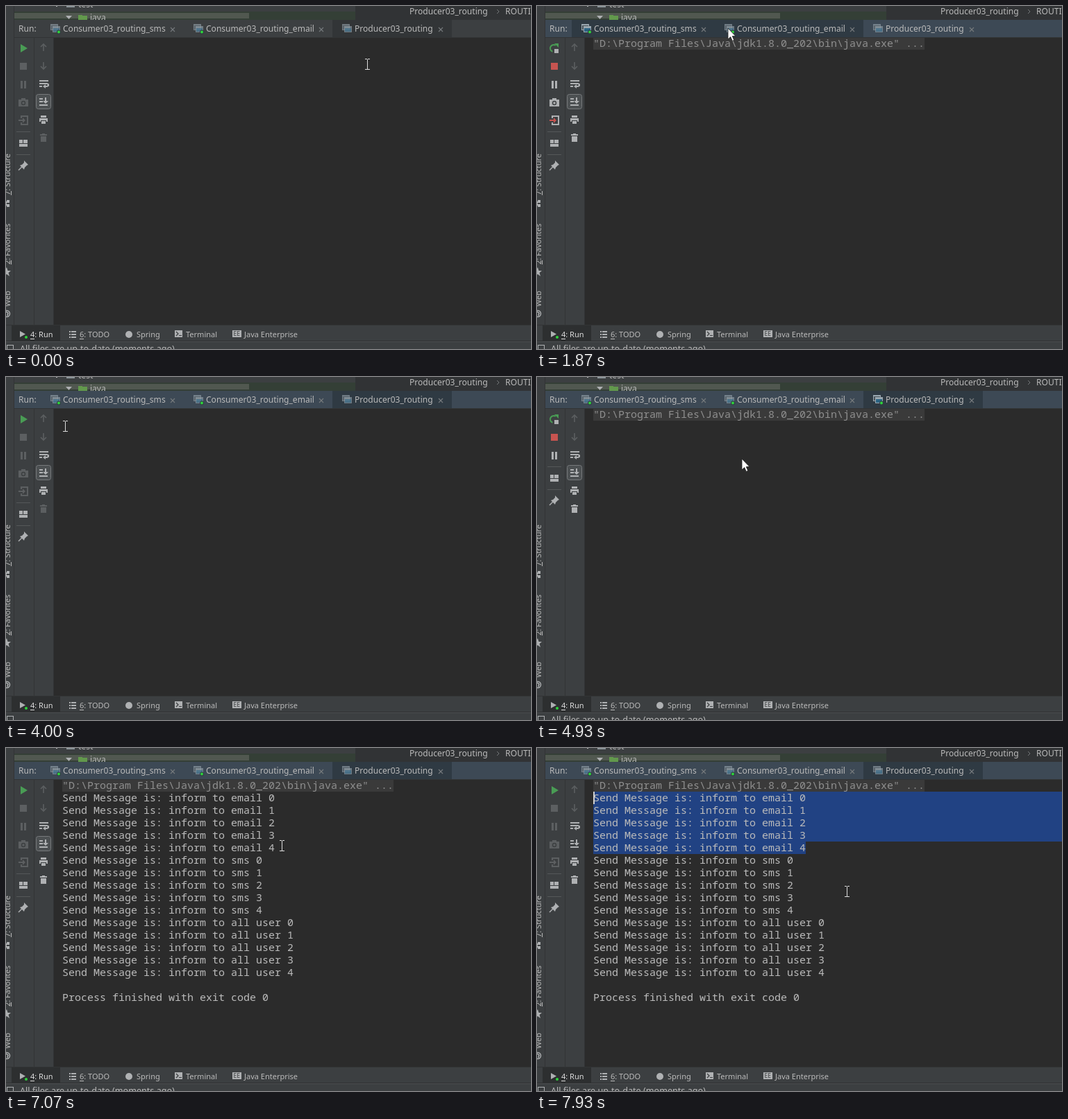
Write an HTML page with a canvas that moves like this. It is 756x495 px and loops after 8000 ms.

```html
<!DOCTYPE html>
<html lang="en">
<head>
<meta charset="utf-8">
<title>Run console</title>
<style>
html, body { margin: 0; width: 100%; height: 100%; overflow: hidden; background: #2b2b2b; }
canvas { display: block; }
</style>
</head>
<body>
<canvas id="stage" width="756" height="495"></canvas>
<script>
const c = document.getElementById('stage').getContext('2d');
const LOOP = 8000, STEP = 200 / 3;
const UI = '"Noto Sans", "Open Sans", sans-serif';
const MONO = '"Noto Sans Mono", "DejaVu Sans Mono", monospace';
const PANEL = '#3c3f41', DARK = '#2b2b2b', LINE = '#323435', ICON = '#afb1b3', DIM = '#5c5f61';
const GREEN = '#499c54', RED = '#c75450', BLUE = '#214283';
const LEFT = 81, CHAR = 9, ROW = 18;

const tabs = [
  { name: 'Consumer03_routing_sms', x: 50, end: 256, close: 240 },
  { name: 'Consumer03_routing_email', x: 256, end: 470, close: 454 },
  { name: 'Producer03_routing', x: 470, end: 642, close: 626 }
];
const messages = ['email', 'sms', 'all user'].flatMap(who =>
  [0, 1, 2, 3, 4].map(i => `Send Message is: inform to ${who} ${i}`));

// pointer path: time, x, y
const path = [
  [66, 520, 84], [500, 300, 55], [933, 72, 28], [1000, 76, 30], [1400, 100, 32], [1533, 100, 32],
  [1867, 275, 32], [2267, 311, 27], [2467, 311, 27], [2933, 599, 28], [3067, 590, 30],
  [3200, 456, 56], [3600, 60, 62], [3867, 25, 58], [4470, 296, 118], [4800, 296, 118],
  [4867, 295, 118], [6800, 295, 118], [6933, 396, 141], [7000, 396, 141], [7067, 397, 141],
  [7200, 397, 141], [7333, 183, 91], [7400, 112, 80], [7600, 80, 76], [7733, 80, 76], [7933, 446, 207]
];

function pointer(t) {
  const i = path.findIndex(p => p[0] > t);
  if (i === 0) return { x: path[0][1], y: path[0][2] };
  if (i < 0) return { x: path.at(-1)[1], y: path.at(-1)[2] };
  const [t0, x0, y0] = path[i - 1], [t1, x1, y1] = path[i];
  const k = (t - t0) / (t1 - t0);
  return { x: Math.round(x0 + (x1 - x0) * k), y: Math.round(y0 + (y1 - y0) * k) };
}

function box(x, y, w, h, color) {
  c.fillStyle = color;
  c.fillRect(x, y, w, h);
}
function text(s, x, y, size = 12.06, color = '#bbbbbb', font = UI) {
  c.font = `${size}px ${font}`;
  c.fillStyle = color;
  c.fillText(s, x, y);
}
function trace(points, close) {
  c.beginPath();
  for (let i = 0; i < points.length; i += 2) c.lineTo(points[i], points[i + 1]);
  if (close) c.closePath();
}
function poly(color, ...points) {
  trace(points, true);
  c.fillStyle = color;
  c.fill();
}
function stroke(color, width, ...points) {
  trace(points);
  c.strokeStyle = color;
  c.lineWidth = width;
  c.stroke();
}
function disc(x, y, r, color) {
  c.beginPath();
  c.arc(x, y, r, 0, Math.PI * 2);
  c.fillStyle = color;
  c.fill();
}
function at(x, y, draw) {
  c.save();
  c.translate(x, y);
  draw();
  c.restore();
}

// icons are drawn around their centre
const icons = {
  play: () => poly(GREEN, -4, -6, 6, 0, -4, 6),
  rerun() {
    c.beginPath();
    c.arc(-1, 0, 5, 1.9, 5.3);
    c.strokeStyle = GREEN;
    c.lineWidth = 2;
    c.stroke();
    poly(GREEN, 0, -7, 6, -7, 6, -1);
    box(0, 1, 6, 6, ICON);
  },
  stop: col => box(-5, -5, 10, 10, col),
  pause(col) {
    box(-4, -5, 3, 11, col);
    box(1, -5, 3, 11, col);
  },
  camera(col) {
    box(-7, -4, 14, 10, col);
    box(-3, -6, 6, 2, col);
    disc(0, 1, 3.2, PANEL);
    disc(0, 1, 1.8, col);
  },
  exit(col, arrow) {
    stroke(col, 2, -3, -3, -3, -6, 6, -6, 6, 6, -3, 6, -3, 3);
    stroke(arrow, 2, -7, 0, 1, 0);
    poly(arrow, -1, -4, 3, 0, -1, 4);
  },
  layout() {
    box(-6, -5, 5, 5, ICON);
    box(0, -5, 6, 5, ICON);
    box(-6, 1, 12, 4, ICON);
  },
  pin() {
    poly(ICON, 1, -7, 7, -1, 5, 0, 2, 3, 1, 6, -5, 0, -2, -1, 1, -4);
    stroke(ICON, 1.5, -2, 2, -7, 7);
  },
  arrow(col, dir) {
    stroke(col, 1.6, 0, -5 * dir, 0, 5 * dir);
    stroke(col, 1.6, -4, dir, 0, 5 * dir, 4, dir);
  },
  wrap() {
    box(-7, -5, 13, 2, ICON);
    stroke(ICON, 2, -7, 0, 4, 0, 6, 1, 6, 3, 4, 4, 1, 4);
    poly(ICON, 2, 1, 2, 7, -2, 4);
    box(-7, 3, 4, 2, ICON);
  },
  bottom() {
    box(-6, 4, 12, 2, ICON);
    box(-6, -5, 5, 2, ICON);
    box(-6, -1, 5, 2, ICON);
    box(2, -6, 2, 6, ICON);
    poly(ICON, -1, -1, 7, -1, 3, 3);
  },
  printer() {
    box(-4, -6, 8, 3, ICON);
    box(-6, -2, 12, 5, ICON);
    box(-4, 1, 8, 5, PANEL);
    box(-3, 2, 6, 4, ICON);
  },
  trash(col) {
    box(-5, -5, 10, 2, col);
    box(-2, -6, 4, 1, col);
    box(-4, -2, 8, 8, col);
  }
};
const icon = (name, x, y, ...args) => at(x, y, () => icons[name](...args));

function topStrip() {
  box(0, 0, 756, 20, PANEL);
  c.save();
  c.beginPath();
  c.rect(12, 0, 744, 20);
  c.clip();
  text('test', 104, 2);
  box(87, 0, 12, 2, '#8c9499');
  box(72, 0, 2, 1, ICON);
  box(12, 8, 491, 12, '#343f36');
  box(12, 10, 338, 8, '#515850');
  poly(ICON, 86, 14, 95, 14, 90.5, 19);
  box(104, 13, 6, 2, '#62994c');
  box(104, 14, 13, 6, '#62994c');
  text('java', 121, 21);
  box(503, 0, 253, 20, '#313335');
  text('Producer03_routing', 581, 12);
  stroke('#74777a', 1, 707, 5, 710, 8, 707, 11);
  text('ROUTING_KEY', 719, 12);
  c.restore();
}

function tabIcon(x, bright, live) {
  c.globalAlpha = bright ? 1 : 0.6;
  box(x, 26, 11, 9, '#9aa7b0');
  box(x + 1, 28, 9, 6, '#4a5359');
  box(x + 3, 29, 11, 9, '#9aa7b0');
  box(x + 4, 32, 9, 5, '#2c6484');
  c.globalAlpha = 1;
  if (live) {
    disc(x + 12, 37.5, 2.9, '#303a42');
    disc(x + 12, 37.5, 2, '#2ed43c');
  }
}

function header(s) {
  box(11, 20, 745, 25, s.focus ? '#3d4955' : PANEL);
  box(11, 45, 745, 1, LINE);
  text('Run:', 18, 37);
  tabs.forEach((tab, i) => {
    const hover = s.arrow && s.y < 46 && s.x >= tab.x && s.x < tab.end;
    const live = i < 2 || s.running;
    if (i === s.tab || hover) box(tab.x, 20, tab.end - tab.x, 25, s.focus ? '#2f3a43' : '#323537');
    tabIcon(tab.x + 14, i === s.tab && live, live);
    text(tab.name, tab.x + 32, 37);
    const x = tab.close;
    stroke('#767a7d', 1.1, x - 3, 31, x + 3, 37);
    stroke('#767a7d', 1.1, x - 3, 37, x + 3, 31);
  });
}

function toolbar(s) {
  const on = s.tab < 2 || s.running, tone = on ? ICON : DIM;
  const compact = s.tab === 2 && s.running, shift = compact ? -52 : 0;
  box(11, 46, 58, 415, PANEL);
  box(40, 46, 1, 415, LINE);
  box(68, 46, 1, 415, LINE);
  icon(on ? 'rerun' : 'play', 25, 61);
  icon('stop', 25, 87, on ? RED : DIM);
  icon('pause', 25, 113, tone);
  if (!compact) {
    icon('camera', 25, 139, tone);
    icon('exit', 25, 165, tone, on ? RED : DIM);
  }
  box(15, 181 + shift, 20, 1, '#555859');
  icon('layout', 25, 198 + shift);
  box(15, 214 + shift, 20, 1, '#555859');
  icon('pin', 25, 230 + shift);

  icon('arrow', 54, 60, DIM, -1);
  icon('arrow', 54, 86, DIM, 1);
  icon('wrap', 55, 112);
  if (s.follow) {
    c.beginPath();
    c.roundRect(43.5, 127.5, 21, 21, 3);
    c.fillStyle = '#4c5052';
    c.fill();
    c.strokeStyle = '#777a7c';
    c.lineWidth = 1;
    c.stroke();
  }
  icon('bottom', 54, 138);
  icon('printer', 54, 164);
  icon('trash', 54, 190, s.command ? ICON : DIM);
}

function selection(s) {
  const { row, col } = s.caret, x = LEFT + col * CHAR, top = 45 + row * ROW;
  const end = LEFT + 34 * CHAR, last = 45 + 5 * ROW;
  if (row === 5) {
    box(x, top, end - x, ROW, BLUE);
  } else {
    box(x, top, 756 - x, ROW, BLUE);
    box(LEFT, top + ROW, 756 - LEFT, last - top - ROW, BLUE);
    box(LEFT, last, end - LEFT, ROW, BLUE);
  }
}

function consoleView(s) {
  box(69, 46, 687, 415, DARK);
  const line = (str, row, color = '#bbbbbb') => text(str, LEFT, 59 + row * ROW, 15, color, MONO);
  if (s.caret) selection(s);
  if (s.command) {
    box(LEFT, 46, 53 * CHAR, 17, '#3a3a3a');
    line('"D:\\Program Files\\Java\\jdk1.8.0_202\\bin\\java.exe" ...', 0, '#8f8f8f');
  }
  if (s.output) messages.forEach((m, i) => line(m, i + 1));
  if (s.finished) line('Process finished with exit code 0', 17);
  if (s.caret) box(LEFT + s.caret.col * CHAR, 45 + s.caret.row * ROW, 2, ROW, '#d0d0d0');
}

function sideLabel(str, y) {
  at(6, y, () => {
    c.rotate(-Math.PI / 2);
    text(str, 0, 0, 11);
    if (str[1] === ':') box(0, 1, 6, 1, '#bbbbbb');
  });
}

function leftStripe() {
  box(0, 0, 11, 461, PANEL);
  box(11, 0, 1, 461, LINE);
  sideLabel('7: Structure', 273);
  sideLabel('2: Favorites', 373);
  sideLabel('Web', 434);
  box(1, 280, 4, 4, ICON);
  box(1, 286, 4, 4, ICON);
  box(0, 282, 1, 6, ICON);
  poly(ICON, 1, 377, 2.5, 382, 7, 382, 3.5, 385, 5, 390, 1, 387, -3, 390, -2, 382);
  c.beginPath();
  c.arc(1, 444, 4.5, 0, Math.PI * 2);
  c.strokeStyle = ICON;
  c.lineWidth = 1.5;
  c.stroke();
  stroke(ICON, 1.5, 0, 441, 3, 443, 2, 447);
}

function bottomBars(s) {
  box(0, 461, 756, 34, PANEL);
  box(0, 460, 756, 1, LINE);
  box(8, 461, 70, 22, '#2d2f30');
  box(0, 483, 756, 1, '#2f3132');
  box(0, 484, 756, 1, '#4b4e50');
  poly(ICON, 20, 469, 28, 473.5, 20, 478);
  disc(29, 478, 2, '#2ed43c');
  text('4: Run', 35, 478, 11, '#dddddd');
  box(35, 480, 6, 1, '#dddddd');
  for (let y = 469; y < 479; y += 4) {
    box(91, y, 2, 2, ICON);
    box(94, y, 7, 2, ICON);
  }
  text('6: TODO', 106, 478, 11);
  box(106, 480, 6, 1, '#bbbbbb');
  disc(177, 474, 5, ICON);
  text('Spring', 188, 478, 11);
  box(243, 468, 11, 10, ICON);
  stroke(PANEL, 1.3, 245, 470, 248, 473, 245, 476);
  box(249, 475, 4, 1, PANEL);
  text('Terminal', 259, 478, 11);
  box(326, 468, 13, 10, ICON);
  text('EE', 327.5, 476, 8.5, PANEL);
  text('Java Enterprise', 343, 478, 11);
  c.strokeStyle = ICON;
  c.lineWidth = 1;
  c.strokeRect(1.5, 489.5, 9, 9);
  if (!s.building) text('All files are up-to-date (moments ago)', 20, 499, 12.6);
}

function cursor(s) {
  at(s.x, s.y, () => {
    if (s.arrow) {
      const shape = [0, 0, 0, 16, 3.7, 12.6, 6.3, 18.4, 8.8, 17.3, 6.3, 11.6, 11, 11.6];
      poly('#ffffff', ...shape);
      stroke('#1c1c1c', 0.8, ...shape, 0, 0);
    } else {
      box(0, -7, 1, 15, '#dcdcdc');
      for (const y of [-8, 7]) {
        box(-3, y, 3, 1, '#dcdcdc');
        box(1, y, 3, 1, '#dcdcdc');
      }
    }
  });
}

function stateAt(t) {
  const p = pointer(t);
  const s = {
    x: p.x, y: p.y,
    tab: t < 990 ? 2 : t < 2190 ? 0 : t < 3060 ? 1 : 2,
    focus: t > 990,
    running: t > 4860 && t < 6260,
    output: t > 6060,
    finished: t > 6460,
    follow: t < 7390,
    building: t > 3860 && t < 4260,
    arrow: p.y < 46 || p.x < 69 || (t > 4860 && t < 6860)
  };
  s.command = s.tab < 2 || t > 4860;
  if (t > 7260) {
    // the caret trails the pointer while dragging, then stays put
    const drag = pointer(Math.min(t, 7660) - 32);
    const col = Math.round((drag.x - LEFT) / CHAR);
    s.caret = { row: Math.floor((drag.y - 45) / ROW), col: Math.max(0, Math.min(34, col)) };
  }
  return s;
}

function draw(now) {
  const t = Math.floor((now % LOOP + 4) / STEP) * STEP;
  const s = stateAt(t);
  topStrip();
  consoleView(s);
  header(s);
  toolbar(s);
  leftStripe();
  bottomBars(s);
  cursor(s);
}

let start;
function tick(now) {
  start ??= now;
  draw(now - start);
  requestAnimationFrame(tick);
}
requestAnimationFrame(tick);
</script>
</body>
</html>
```
